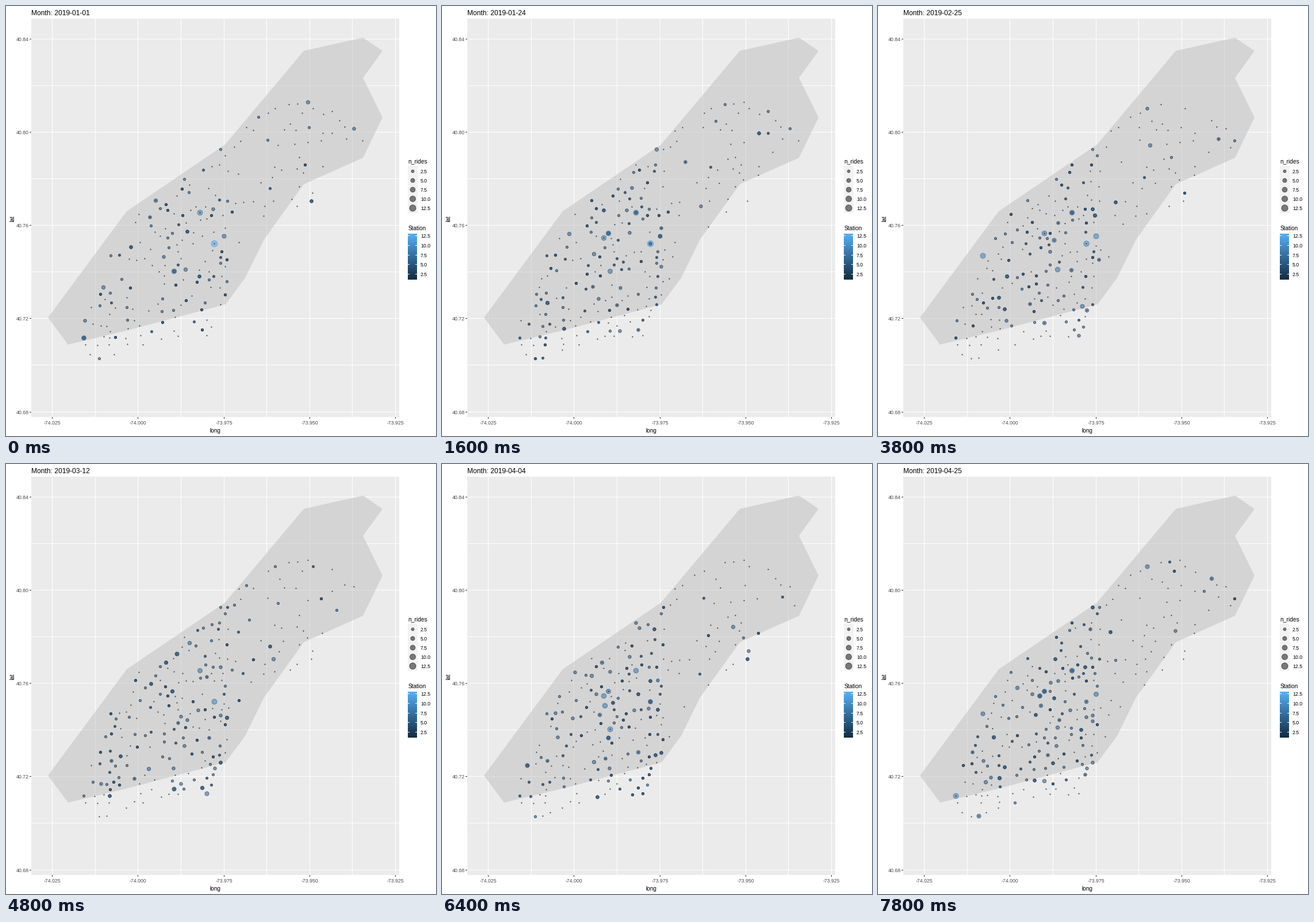
A matplotlib script that plays this animation: 748x748 px, repeating every 8 s.

```python
import numpy as np
import matplotlib.pyplot as plt
from matplotlib.animation import FuncAnimation
from matplotlib.colors import LinearSegmentedColormap
from matplotlib.patches import Polygon, Rectangle
from matplotlib.path import Path

SIZE, DPI = 748, 64
PX = 72 / DPI                      # points per pixel
FRAMES, INTERVAL = 40, 200
START = np.datetime64("2019-01-01")
LAST_DAY = 114

plt.rcParams["font.family"] = "Liberation Sans"
blues = LinearSegmentedColormap.from_list("blues", ["#132B43", "#336C9B", "#56B1F7"])

AREA = [(73, 542), (108, 589), (212, 564), (382, 519), (416, 473), (449, 406),
        (518, 310), (621, 264), (655, 194), (621, 125), (655, 78), (621, 55),
        (518, 78), (381, 241), (210, 357)]

# Outline of the streets that have stations
STREETS = Path([(126, 602), (130, 560), (178, 464), (212, 374), (315, 295),
                (402, 211), (448, 172), (510, 160), (570, 174), (642, 238),
                (567, 264), (547, 331), (461, 387), (403, 444), (384, 520),
                (352, 576), (265, 581), (190, 611), (146, 618)])

# Stations with the most rides, the busiest first
HUBS = [(362, 413), (292, 461), (283, 420), (289, 395), (379, 400),
        (281, 403), (182, 434), (312, 458), (337, 359), (135, 577)]


def in_park(x, y):
    """True inside the empty strip between the two sides of the park."""
    along = ((x - 395) * 70 - (y - 325) * 75) / 102.6
    across = ((x - 395) * 75 + (y - 325) * 70) / 102.6
    return -8 < along < 112 and abs(across) < 15


def make_stations(downtown=215, uptown=75):
    rng = np.random.default_rng(11)
    pts = list(HUBS)
    room = {False: downtown, True: uptown}
    for _ in range(12000):
        x, y = int(rng.integers(124, 642)), int(rng.integers(158, 618))
        up = x > 385
        if not room[up] or in_park(x, y) or not STREETS.contains_point((x, y)):
            continue
        gap = 13 if up else 10
        if min(np.hypot(x - a, y - b) for a, b in pts) >= gap:
            pts.append((x, y))
            room[up] -= 1
    return np.array(pts, float)


STATIONS = make_stations()
COUNT = len(STATIONS)
# Fewer rides uptown and along the south-east shore
quiet = (STATIONS[:, 0] > 385) | (STATIONS[:, 1] > 565)
busy_weight = np.where(quiet, 0.35, 1.2)


def dot_area(n):
    """Area scale from size 1 to 6 over 1 to 13 rides."""
    radius = 0.65 + 5 * np.sqrt((np.asarray(n, float) - 1) / 12)
    return (2 * radius * PX) ** 2


def rides_on(day):
    """Positions and ride counts of all dots on one day."""
    rng = np.random.default_rng(500 + day)
    t = day / LAST_DAY
    active = rng.random(COUNT) < 0.68 + 0.18 * t
    many = rng.random(COUNT) < (0.38 + 0.16 * t) * busy_weight
    n = np.where(many, 1 + rng.geometric(0.72, COUNT).clip(max=4), 1)

    hubs = np.arange(len(HUBS))
    n[hubs] = np.where(rng.random(len(HUBS)) < 0.5, rng.integers(4, 9, len(HUBS)), 2)
    n[0] = round(12.5 - 8 * t)
    active[hubs] = True

    # A second group of riders at the same station
    extra = active & (n > 1) & (rng.random(COUNT) < 0.6)
    second = np.where(rng.random(COUNT) < 0.5, 1, n.clip(max=3))
    xy = np.vstack([STATIONS[active], STATIONS[extra]])
    return xy + 0.5, np.concatenate([n[active], second[extra]])


fig = plt.figure(figsize=(SIZE / DPI, SIZE / DPI), dpi=DPI, facecolor="white")
ax = fig.add_axes([0, 0, 1, 1])
ax.axis("off")


def box(x, y, w, h, color, z=0):
    ax.add_patch(Rectangle((x, y), w, h, fc=color, lw=0, zorder=z, antialiased=False))


def label(x, y, s, size, color="black", ha="left"):
    """Text whose capitals are centred on height y."""
    return ax.text(x, y + 0.36 * size, s, fontsize=size * PX, color=color,
                   ha=ha, va="baseline", zorder=6)


# Panel, grid and axes; every second grid line has a label
box(44, 22, 640, 693, "#EBEBEB")
for i in range(9):
    x, y = round(80 + 74.63 * i), round(56.75 + 81.1 * i)
    box(x, 22, 1, 693, "white", 1)
    box(44, y, 640, 1, "white", 1)
    if i % 2 == 0:
        box(x, 715, 1, 3, "#333333", 1)
        box(41, y, 3, 1, "#333333", 1)
        label(x + 0.5, 725, f"{-74.025 + 0.0125 * i:.3f}", 8.7, "#4D4D4D", "center")
        label(40, y + 0.5, f"{40.84 - 0.02 * i:.2f}", 8.7, "#4D4D4D", "right")
label(363.5, 738, "long", 10, ha="center")
ax.text(11, 370, "lat", fontsize=10 * PX, rotation=90, ha="center", va="center")
ax.add_patch(Polygon(AREA, fc="#BEBEBE", alpha=0.5, lw=0, zorder=2))

# Size and colour legends
label(699.5, 269.5, "n_rides", 10.2)
box(699, 278, 17, 82, "#F2F2F2")
label(699.5, 386.5, "Station", 10)
ax.imshow(np.linspace(1, 0, 256)[:, None], cmap=blues, extent=(699, 715, 476, 396),
          aspect="auto", zorder=3)
for i in range(5):
    n = 2.5 * (i + 1)
    y = 287 + 16.1 * i
    ax.scatter([707.5], [y], s=dot_area(n), fc=(0, 0, 0, 0.5), ec=(0, 0, 0, 0.5),
               lw=PX, zorder=4)
    label(721, y + 0.5, f"{n:.1f}", 8.8)
    y = round(476 - (n - 1) * 80 / 12)
    box(699, y, 3, 1, "white", 4)
    box(712, y, 3, 1, "white", 4)
    label(721, y + 0.5, f"{n:.1f}", 8.8)
ax.set_xlim(0, SIZE)
ax.set_ylim(SIZE, 0)

title = label(44, 12, "", 12)
dots = ax.scatter([], [], lw=PX, zorder=5)


def update(frame):
    day = int(2.92 * frame + 0.3)
    xy, n = rides_on(day)
    colors = blues((n - 1) / 12)
    colors[:, 3] = 0.5
    edges = colors.copy()
    edges[:, 3] = 0.7
    dots.set_offsets(xy)
    dots.set_sizes(dot_area(n))
    dots.set_facecolor(colors)
    dots.set_edgecolor(edges)
    title.set_text(f"Month: {START + day}")
    return dots, title


anim = FuncAnimation(fig, update, frames=FRAMES, interval=INTERVAL,
                     init_func=lambda: update(0), repeat=True, repeat_delay=0)
plt.show()
```
